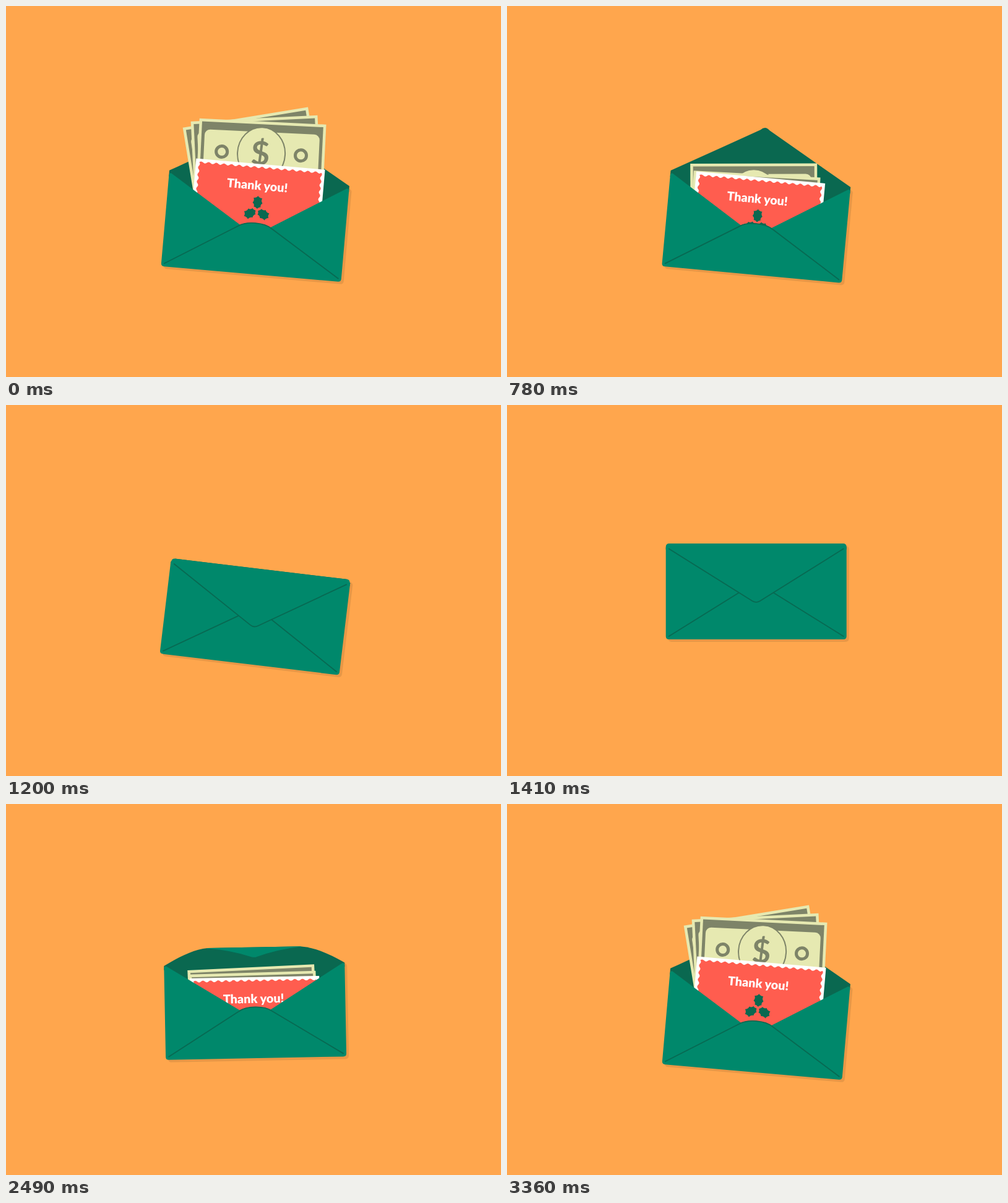
These frames come from a looping animation (800 px wide and 600 px high, 3.6 s). An HTML page:

```html
<!DOCTYPE html>
<html lang="en">
<head>
<meta charset="utf-8">
<title>Thank you envelope</title>
<style>
  html, body { margin: 0; width: 100%; height: 100%; overflow: hidden; background: #ffa64d; }
  svg { display: block; width: 800px; height: 600px; }
  text { font-family: Lato, "Open Sans", sans-serif; font-weight: 700; text-anchor: middle; }
  .thanks { font-weight: 900; font-size: 19.8px; fill: #fff; }
  .green { fill: #00886b; }
  .deep { fill: #0a6850; }
  .line { fill: none; stroke: #086952; stroke-width: 1.8; stroke-linecap: round; stroke-linejoin: round; }
  .paper { fill: #e6e9b1; }
  .ink { fill: #7e8468; }
  .ring { fill: none; stroke: #7e8468; stroke-width: 5; }
  .red { fill: #ff5d4f; }
</style>
</head>
<body>
<svg viewBox="0 0 800 600">
  <defs>
    <g id="bill">
      <rect class="paper" x="-102.5" y="-52" width="205" height="104"/>
      <rect class="ink" x="-98" y="-47.5" width="196" height="95"/>
      <rect class="paper" x="-93" y="-35" width="186" height="70" rx="9"/>
      <circle class="ring" cx="-64" r="9"/>
      <circle class="ring" cx="64" r="9"/>
      <ellipse class="paper" rx="38.5" ry="42.5" stroke="#7e8468" stroke-width="2"/>
      <text class="ink" x="-1.5" y="18.5" font-size="53">$</text>
    </g>
    <path id="leaf" class="deep" d="M0-11Q2-7.5 7-7.5Q5-3.5 8 .5Q4.5 3 5.5 7Q1.5 7 0 11Q-1.5 7-5.5 7Q-4.5 3-8 .5Q-5-3.5-7-7.5Q-2-7.5 0-11Z"/>
  </defs>
  <rect width="800" height="600" fill="#ffa64d"/>
  <rect id="shadow" x="-146" y="-77.5" width="292" height="155" rx="5" fill="#000" opacity=".09"/>
  <g id="envelope">
    <path id="inside" class="deep"/>
    <use href="#bill" class="bill"/>
    <use href="#bill" class="bill"/>
    <use href="#bill" class="bill"/>
    <g id="card">
      <rect x="-104.5" width="209" height="114" fill="#fff"/>
      <path id="scallop" class="red"/>
      <text class="thanks" x="-2.3" y="41.8">Thank you!</text>
      <g transform="translate(.5 74.5)">
        <use href="#leaf" y="-12"/>
        <use href="#leaf" y="-12" transform="rotate(120)"/>
        <use href="#leaf" y="-12" transform="rotate(240)"/>
        <circle class="red" r="2.5"/>
      </g>
    </g>
    <path class="green" d="M-146-69q0-6 4-4.5L-25-.5C-13-7 13-7 25-.5L142-73.5q4-1.5 4 4.5V72.5q0 5-5 5H-141q-5 0-5-5Z"/>
    <path class="line" d="M-141 72.5L-27 1.6C-14-7.5 14-7.5 27 1.6L141 72.5"/>
    <g id="flap">
      <path id="flapFill" class="green"/>
      <path id="flapLine" class="line"/>
    </g>
  </g>
</svg>
<script>
const LOOP = 3600, STEP = 30, CX = 402.7;
const $ = id => document.getElementById(id);
const set = (el, name, value) => el.setAttribute(name, value);
const mix = (a, b, u) => a + (b - a) * u;
const clamp = u => Math.min(1, Math.max(0, u));
const cubic = u => u < .5 ? 4 * u ** 3 : 1 - 4 * (1 - u) ** 3;

// Smooth curve through [time, value] keys that never overshoots them.
function track(keys, t) {
  const n = keys.length - 1;
  if (t <= keys[0][0]) return keys[0][1];
  if (t >= keys[n][0]) return keys[n][1];
  let i = 0;
  while (t >= keys[i + 1][0]) i++;
  const rise = k => (keys[k + 1][1] - keys[k][1]) / (keys[k + 1][0] - keys[k][0]);
  const slope = k => {
    if (k === 0 || k === n) return 0;
    const a = rise(k - 1), b = rise(k);
    return a * b <= 0 ? 0 : 2 * a * b / (a + b);
  };
  const [t0, v0] = keys[i], [t1, v1] = keys[i + 1];
  const d = t1 - t0, u = (t - t0) / d, s = u * u * (3 - 2 * u);
  return mix(v0, v1, s) + d * u * (1 - u) * ((1 - u) * slope(i) - u * slope(i + 1));
}

const TILT = [[0, 5], [750, 5], [810, 5.9], [1020, 10.5], [1060, 11], [1350, .8], [1410, 0],
  [2130, 0], [2160, -.8], [2325, -11.5], [2490, -1.1], [2670, 5]];
const HEIGHT = [[0, 356.3], [750, 356.3], [810, 359], [1020, 374], [1060, 375], [1350, 303],
  [1410, 301.5], [2130, 301.5], [2160, 298.5], [2300, 281], [2490, 333.6], [2670, 356.3]];

// Flap poses: half width of the fold, fold y, tip y, bend.
const OPEN = [13, -157, -161, 0], DOME = [50, -113, -116, 1];
const FOLD = [76, -102, -84.5, .8], SHUT = [146, -77.5, 19.3, 0];
const FLAP = [[0, OPEN], [780, OPEN], [1020, DOME], [1080, FOLD], [1210, SHUT],
  [2310, SHUT], [2490, FOLD], [2550, DOME], [2760, OPEN]];
const flapKeys = OPEN.map((_, k) => FLAP.map(([t, pose]) => [t, pose[k]]));

// Back to front: raised x, y, angle; stowed y; start of the way down and up.
const BILLS = [
  [-18.3, -123.7, -14.3, -4, 368, 2227],
  [-9.8, -122.2, -7.8, 1, 332, 2256],
  [-.4, -118, -2.2, 6, 300, 2280]
];
const billEls = document.querySelectorAll('.bill');

const stowed = (t, down, downTime, up, upTime) =>
  cubic(clamp((t - down) / downTime)) - cubic(clamp((t - up) / upTime));

function drawFlap(t) {
  const [a, y, tip, bend] = flapKeys.map(keys => track(keys, t));
  const r = 5.5 * (1 - bend), hinge = -75 + 3 * (1 - bend) * (tip > y ? 1 : -1);
  const w = a - r, third = (146 - w) / 3, lift = (y - hinge) / 3;
  const c1 = hinge + lift * (1 + .6 * bend), c2 = y - lift * (1 - bend);
  const top = tip < y ? `Q0 ${2 * tip - y} ${w} ${y}` : `H${w}`;
  set($('inside'), 'd', `M0 20L-146-68V${hinge}C${-146 + third} ${c1} ${-w - third} ${c2} ${-w} ${y}` +
    `${top}C${w + third} ${c2} ${146 - third} ${c1} 146 ${hinge}V-68Z`);

  set($('flap'), 'visibility', tip > y ? 'visible' : 'hidden');
  const yr = y + r, mid = mix((yr + tip) / 2, y, .6 * bend);
  const tx = a * .042, ty = mix(tip, yr, .042);
  const sides = (x, y0) => `M${-x} ${y0}Q${-a / 2} ${mid} ${-tx} ${ty}Q0 ${tip} ${tx} ${ty}Q${a / 2} ${mid} ${x} ${y0}`;
  set($('flapFill'), 'd', `${sides(a, yr)}Q${a} ${y} ${w} ${y}H${-w}Q${-a} ${y} ${-a} ${yr}Z`);
  set($('flapLine'), 'd', sides(a * .966, mix(yr, tip, .034)));
}

function draw(t) {
  const tilt = track(TILT, t), cy = track(HEIGHT, t);
  set($('envelope'), 'transform', `translate(${CX} ${cy}) rotate(${tilt})`);
  set($('shadow'), 'transform', `translate(${CX + 4} ${cy + 4}) rotate(${tilt})`);
  BILLS.forEach(([x, y, angle, low, down, up], i) => {
    const s = stowed(t, down, 760, up, 860);
    set(billEls[i], 'transform', `translate(${mix(x, -2.4, s)} ${mix(y, low, s)}) rotate(${angle * (1 - s)})`);
  });
  set($('card'), 'transform', `translate(0 ${mix(-101, -38, stowed(t, 450, 760, 2170, 810))})`);
  drawFlap(t);
}

// Wavy red panel inside the white card edge.
function wave(dx, dy, count) {
  const bulge = `q${dx / 2 + dy * .45} ${dy / 2 - dx * .45} ${dx} ${dy}`;
  return bulge + `t${dx} ${dy}`.repeat(count * 2 - 1);
}
const sx = 198 / 32, sy = 103 / 18;
set($('scallop'), 'd', 'M-99 5.5' + wave(sx, 0, 16) + wave(0, sy, 9) + wave(-sx, 0, 16) + wave(0, -sy, 9) + 'Z');

function tick() {
  const t = performance.now() % LOOP;
  draw(Math.floor(t / STEP) * STEP);
  requestAnimationFrame(tick);
}
tick();
</script>
</body>
</html>
```
